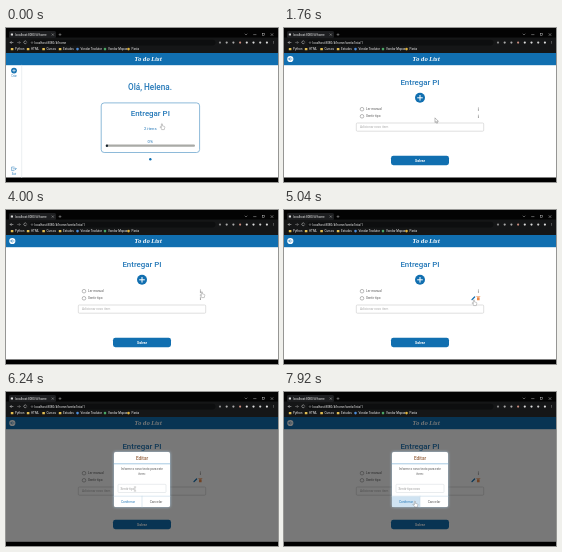
An HTML page for the animation above (8000 ms loop, 272 by 154 pixels).

```html
<!DOCTYPE html>
<html lang="pt-BR">
<head>
<meta charset="utf-8">
<title>To do List</title>
<style>
html, body { margin: 0; width: 100%; height: 100%; overflow: hidden; background: #000; }
svg { display: block; width: 100%; height: 100%; }
text { font-family: Roboto, "Open Sans", sans-serif; dominant-baseline: central; white-space: pre; }
.logo { font-family: "Noto Serif", "Liberation Serif", serif; font-style: italic; font-weight: 700; }
.title { font-weight: 500; }
.glow { filter: drop-shadow(0 0 1.8px #a9c9e0); }
</style>
</head>
<body>
<svg id="stage" viewBox="0 0 272 154" preserveAspectRatio="none"></svg>
<script>
const LOOP = 8000, STEP = 80;
const BLUE = '#116fb0', INK = '#2478b8';
const NS = 'http://www.w3.org/2000/svg';
const stage = document.getElementById('stage');

function add(parent, tag, attrs) {
  const node = document.createElementNS(NS, tag);
  for (const k in attrs) node.setAttribute(k, attrs[k]);
  parent.appendChild(node);
  return node;
}
const group = (p, a = {}) => add(p, 'g', a);
const rect = (p, x, y, width, height, fill, a = {}) => add(p, 'rect', { x, y, width, height, fill, ...a });
const dot = (p, cx, cy, r, fill, a = {}) => add(p, 'circle', { cx, cy, r, fill, ...a });
const line = (p, d, stroke, width = 0.6, a = {}) =>
  add(p, 'path', { d, stroke, 'stroke-width': width, fill: 'none', 'stroke-linecap': 'round', ...a });
function text(p, x, y, size, str, fill, a = {}) {
  const node = add(p, 'text', { x, y, 'font-size': size, fill, ...a });
  node.textContent = str;
  return node;
}
const centred = (p, x, y, size, str, fill, a = {}) =>
  text(p, x, y, size, str, fill, { 'text-anchor': 'middle', ...a });
const show = (node, on) => node.setAttribute('visibility', on ? 'inherit' : 'hidden');

// browser window
rect(stage, 0, 0, 272, 154, '#000');
rect(stage, 0, 25, 272, 124.5, '#fff');
const chrome = group(stage);
rect(chrome, 0, 0, 272, 25, '#151617');
rect(chrome, 0, 0, 272, 9.5, '#030303');
rect(chrome, 3, 3, 47, 7, '#1d1e20', { rx: 1.5 });
rect(chrome, 4.8, 5.4, 2.2, 2.2, '#ddd', { rx: 0.3 });
const tab = text(chrome, 9, 6.6, 3, '', '#eee');
line(chrome, 'M46 5.8l1.6 1.6m0-1.6l-1.6 1.6M53 6.6h2m-1-1v2', '#ccc', 0.4);
line(chrome, 'M239 6l1 1 1-1M247.6 6.6h2.4M265 5.6l2 2m0-2l-2 2', '#ddd', 0.4);
rect(chrome, 256.5, 5.6, 2, 2, 'none', { stroke: '#ddd', 'stroke-width': 0.4 });
line(chrome, 'M7 14.5H4.2l1.2-1.2m-1.2 1.2l1.2 1.2', '#ddd', 0.5);
line(chrome, 'M11.5 14.5h2.8l-1.2-1.2m1.2 1.2l-1.2 1.2', '#888', 0.5);
line(chrome, 'M20.4 13.5a1.4 1.4 0 1 0 .1 1.5', '#ddd', 0.5);
rect(chrome, 23.5, 11.8, 186, 5.6, '#0d0e0f', { rx: 2.8 });
dot(chrome, 26, 14.6, 0.8, 'none', { stroke: '#bbb', 'stroke-width': 0.4 });
const url = text(chrome, 28.5, 14.6, 3, '', '#eee');
['#888', '#aaa', '#aaa', '#c98b7d', '#ddd', '#ddd', '#ccc', '#ddd']
  .forEach((c, i) => dot(chrome, 214 + i * 6.7, 14.6, 1.1, c));
for (const y of [13.4, 14.6, 15.8]) dot(chrome, 267.5, y, 0.3, '#ddd');
[['Python', 6, '#e4bf52'], ['HTML', 22, '#e4bf52'], ['Cursos', 37.5, '#e4bf52'], ['Estudos', 54, '#e4bf52'],
 ['Vondar Tradutor', 71.5, '#4d8ddb'], ['Vondar Mapas', 99, '#4aa564'], ['Pasta', 122.5, '#e0b33c']]
  .forEach(([name, x, c], i) => {
    i < 4 ? rect(chrome, x - 1.2, 20, 2.6, 2.2, c, { rx: 0.3 }) : dot(chrome, x, 21.1, 1.3, c);
    text(chrome, x + 3, 21.1, 3, name, '#eee');
  });

// shared header
rect(stage, 0, 25, 272, 12.2, BLUE);
centred(stage, 142.3, 30.7, 5.5, 'To do List', '#fff', { class: 'logo' });

// home page
const home = group(stage);
line(home, 'M15.7 37.2V149.5', '#d9dfe4', 0.5);
dot(home, 8, 42.6, 2.9, BLUE);
line(home, 'M6.7 42.6h2.6m-1.3-1.3v2.6', '#fff', 0.6);
centred(home, 8, 48.6, 2.6, 'Criar', INK);
line(home, 'M8 139H5.6v3.6h2.4M7.2 140.8h3l-1-1m1 1l-1 1', INK, 0.5);
centred(home, 8, 146, 2.6, 'Sair', INK);
centred(home, 144, 59.3, 8.2, 'Olá, Helena.', INK, { class: 'title' });
const hover = group(home);
rect(hover, 90.5, 74.5, 107.5, 50.5, '#eeeeee');
const card = rect(home, 95.2, 74.9, 98.4, 49.6, '#fff', { rx: 3, stroke: '#5e9cc9', 'stroke-width': 0.7 });
centred(home, 144.3, 85.6, 7.9, 'Entregar PI', INK, { class: 'title' });
centred(home, 144.3, 100.1, 4.3, '2 itens', INK);
centred(home, 144.3, 113, 4.2, '0%', INK);
rect(home, 100, 116.6, 89, 2.2, '#a9aaa6', { rx: 1.1 });
dot(home, 100.9, 117.7, 1.2, '#18242e');
dot(home, 144.3, 131.2, 1.2, BLUE);

// list page
const list = group(stage);
dot(list, 6.3, 31, 3.1, '#fff');
line(list, 'M8 31H4.7l1.4-1.4M4.7 31l1.4 1.4', BLUE, 0.6);
centred(list, 136, 54.8, 7.9, 'Entregar PI', INK, { class: 'title' });
dot(list, 136, 69.8, 5, BLUE);
line(list, 'M133.6 69.8h4.8m-2.4-2.4v4.8', '#fff', 1);
const dots = [['Ler manual', 81.2], ['Sentir tipo', 88.3]].map(([name, y]) => {
  dot(list, 78, y, 1.8, '#fff', { stroke: '#777', 'stroke-width': 0.5 });
  text(list, 82, y, 3.2, name, '#555');
  const more = group(list);
  for (const d of [-1.2, 0, 1.2]) dot(more, 194.3, y + d, 0.45, '#444');
  return more;
});
const tools = group(list);
line(tools, 'M188 89.6l2.6-2.6', BLUE, 1.3);
rect(tools, 193, 87.2, 2.6, 3, '#ee8a4a', { rx: 0.3 });
line(tools, 'M192.7 86.5h3.2', '#ee8a4a', 0.6);
rect(list, 72.3, 95, 127.4, 8.2, '#fff', { rx: 1, stroke: '#ccc', 'stroke-width': 0.6 });
text(list, 76, 99.2, 3.2, 'Adicionar novo item', '#aaa');
rect(list, 107, 127.8, 58, 9.4, BLUE, { rx: 2.4 });
centred(list, 136, 132.6, 3.5, 'Salvar', '#fff', { 'font-weight': 700 });

// dialog
const shade = rect(stage, 0, 25, 272, 124.5, '#000');
const modal = group(stage);
rect(modal, 108, 60, 56, 55, '#fff', { rx: 1.6, class: 'glow' });
centred(modal, 136, 66.2, 4.7, 'Editar', '#94603c', { class: 'title' });
line(modal, 'M108 71.8H164', '#69a5ce', 0.6);
centred(modal, 136, 77.4, 3.1, 'Informe o novo texto para este', '#555');
centred(modal, 136, 81.6, 3.1, 'item:', '#555');
rect(modal, 112, 92.3, 48, 8.2, '#fff', { rx: 0.8, stroke: '#d3d8dc', 'stroke-width': 0.5 });
const field = text(modal, 114.5, 96.5, 3.1, '', '#999');
const pressed = rect(modal, 108, 104.4, 28, 10.6, '#cfe3f2', { rx: 1 });
line(modal, 'M108 104.2H164M136 104.2V115', '#b9d0e0', 0.5);
centred(modal, 122, 109.5, 3.2, 'Confirmar', INK);
centred(modal, 150, 109.5, 3.2, 'Cancelar', '#555');

// pointers
const pointer = group(stage);
const halo = dot(pointer, 0, 0, 4, '#777');
const shapes = {
  hand: line(pointer, 'M-.5 2.8l-1.6-1.8q.2-.8 1 0l.5.5v-3.6q.5-.8 1 0v2l2 .5q.6.3.4 1l-.5 1.9v.3h-2.3z', '#666', 0.35, { fill: '#fff' }),
  arrow: line(pointer, 'M-.8-1.8v4.3l1-.9.8 1.7.8-.4-.8-1.6h1.3z', '#444', 0.35, { fill: '#fff' }),
  beam: line(pointer, 'M-.8-2h1.6M0-2v4M-.8 2h1.6', '#888', 0.35)
};

// time, x, y, pointer shape from that time on
const path = [
  [0, 156, 98, 'hand'], [400, 156, 97], [960, 155, 93], [1600, 155, 93, 'arrow'],
  [2480, 118, 82], [2880, 118, 82], [3760, 196, 84, 'hand'], [4160, 196, 84],
  [4400, 195, 89.5], [4640, 195, 89.5], [4960, 190, 92], [5600, 190, 92, 'arrow'],
  [6080, 129, 97, 'beam'], [7280, 129, 97, 'arrow'], [7680, 131, 111.5, 'hand'], [LOOP, 131, 111.5]
];
const PRESS = 1040, OPEN = 1360, TOOLS = 4560, DIALOG = 5680;
const BASE = 'Sentir tipo', EXTRA = ' novo';

const clamp = v => Math.min(1, Math.max(0, v));
const ease = v => v * v * (3 - 2 * v);
const ramp = (t, from, span) => ease(clamp((t - from) / span));

function movePointer(t) {
  let i = 0, kind = '';
  while (i < path.length - 2 && path[i + 1][0] <= t) i++;
  for (let k = 0; k <= i; k++) kind = path[k][3] || kind;
  const [t0, x0, y0] = path[i], [t1, x1, y1] = path[i + 1];
  const k = ramp(t, t0, t1 - t0);
  pointer.setAttribute('transform', `translate(${x0 + (x1 - x0) * k} ${y0 + (y1 - y0) * k})`);
  for (const name in shapes) show(shapes[name], name === kind);
  halo.setAttribute('opacity', 0.3 * (ramp(t, PRESS, 80) - ramp(t, PRESS + 160, 160)));
}

function render(t) {
  const onList = t >= OPEN;
  show(home, !onList);
  show(list, onList);
  tab.textContent = 'localhost:8080/#/home';
  url.textContent = 'localhost:8080/#/home' + (onList ? '/tarefa/lista/1' : '');

  const lift = ramp(t, 960, 160);
  hover.setAttribute('opacity', lift);
  card.setAttribute('fill', lift > 0.5 ? '#f2f3f4' : '#fff');

  show(dots[1], t < TOOLS);
  show(tools, t >= TOOLS);

  const pop = ramp(t, DIALOG, 240);
  shade.setAttribute('opacity', 0.53 * pop);
  modal.setAttribute('opacity', pop);
  modal.setAttribute('transform', `translate(136 87.5) scale(${0.85 + 0.15 * pop}) translate(-136 -87.5)`);
  const typed = Math.floor(clamp((t - 6480) / 720) * EXTRA.length);
  const caret = t >= 6320 && t < 7600 && t % 1000 < 500 ? '|' : '';
  field.textContent = BASE + EXTRA.slice(0, typed) + caret;
  show(pressed, t >= 7600);
  movePointer(t);
}

const start = performance.now();
function tick() {
  const t = (performance.now() - start) % LOOP;
  render(Math.floor(t / STEP) * STEP);
  requestAnimationFrame(tick);
}
render(0);
requestAnimationFrame(tick);
</script>
</body>
</html>
```
